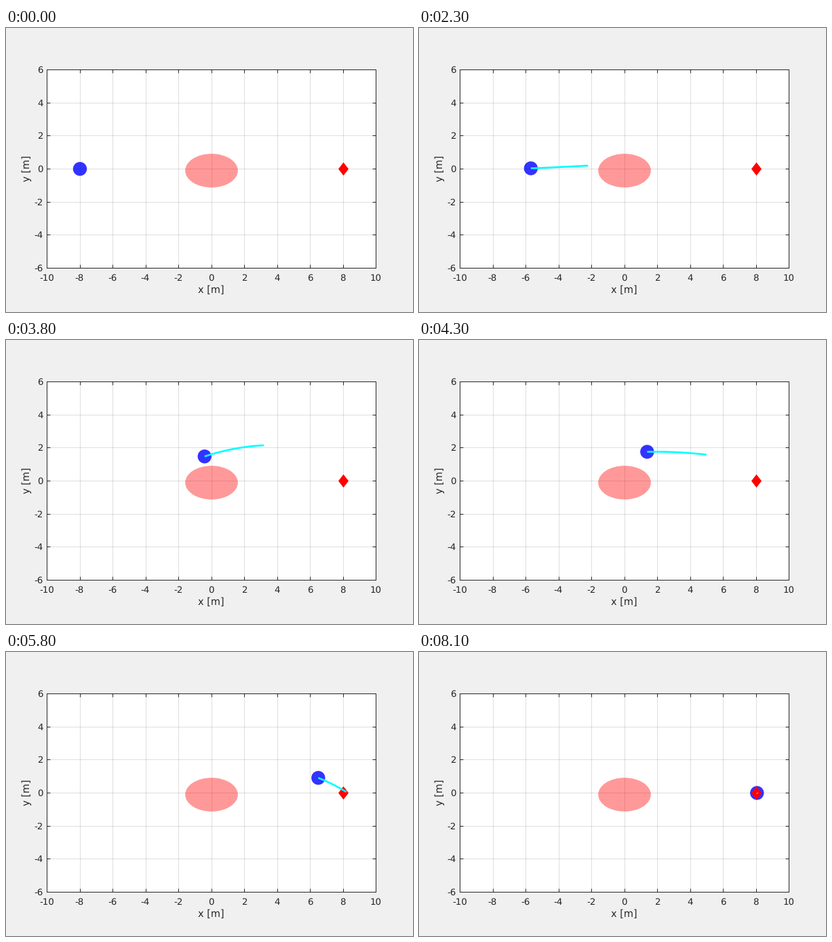
These frames come from a looping animation (600 px wide and 418 px high, 9600 ms). A matplotlib script:

```python
import numpy as np
import matplotlib.pyplot as plt
from matplotlib.animation import FuncAnimation
from matplotlib.patches import Circle, Ellipse, Polygon
from matplotlib.transforms import Affine2D, IdentityTransform

W, H, DPI = 600, 418, 100
LEFT, RIGHT, TOP, BOTTOM = 60, 545, 61, 353
FRAMES, INTERVAL = 96, 100
FIRST, HOLD, LAST = 9, 62, 72
INK = (0.15, 0.15, 0.15)

# Robot motion in metres and steps
START, SPEED, SOFTNESS, HORIZON = -8, 0.36, 3, 10
GO, STOP, NOTICE = 8.8, 53.55, 17

plt.rcParams["font.family"] = "DejaVu Sans"
plt.rcParams["text.hinting"] = "none"


def pt(px):
    return px * 72 / DPI


def sigmoid(v):
    return 1 / (1 + np.exp(-v))


def ramp(t):
    """Distance covered when the speed fades in around t = 0."""
    return SPEED * SOFTNESS * np.logaddexp(0, t / SOFTNESS)


def free_run(step):
    return START + ramp(step - GO) - ramp(-GO)


END = START + SPEED * (STOP - GO) - ramp(-GO)


def path(x):
    """Height of the route: a rise before the obstacle, then a fall to the goal."""
    left = END - x
    return sigmoid((x + 1.5) / 1.05) * left / (1.15 + 0.36 * left)


def robot_at(step):
    x = free_run(step) - ramp(step - STOP)
    return x, path(x)


def plan_at(step):
    """Predicted route: leaves along the tangent and bends towards the path."""
    x, y = robot_at(step)
    lead = min(free_run(step + HORIZON) - x, 0.03 + 1.07 * (END - x))
    tangent = (path(x + 0.01) - path(x - 0.01)) / 0.02 * lead
    bend = 0.5 * sigmoid(step - NOTICE) * (path(x + lead) - y - tangent)
    u = np.linspace(0, 1, 21)
    return x + lead * u, y + tangent * u + bend * u * u


fig = plt.figure(figsize=(W / DPI, H / DPI), dpi=DPI, facecolor="#f0f0f0")
ax = fig.add_axes([LEFT / W, 1 - BOTTOM / H, (RIGHT - LEFT) / W, (BOTTOM - TOP) / H])
ax.set(xlim=(-10, 10), ylim=(-6, 6),
       xticks=range(-10, 11, 2), yticks=range(-6, 7, 2))
ax.set_axisbelow(True)
ax.grid(color=INK, alpha=0.15, linewidth=pt(1))
ax.tick_params(direction="in", top=True, right=True, length=pt(5), width=pt(1),
               color=INK, labelbottom=False, labelleft=False)
for spine in ax.spines.values():
    spine.set(color=INK, linewidth=pt(1))


def label(x, y, text, size=13.33, ha="center", rotation=0):
    fig.text(x, H - y, text, transform=IdentityTransform(), fontsize=pt(size),
             color=INK, ha=ha, va="baseline", rotation=rotation,
             rotation_mode="anchor")


for v in range(-10, 11, 2):
    label(302.5 + (RIGHT - LEFT) / 20 * v, 372, str(v))
for v in range(-6, 7, 2):
    label(54.5, 212 - (BOTTOM - TOP) / 12 * v, str(v), ha="right")
label(302.3, 390, "x [m]", 14.5)
label(34.5, 207, "y [m]", 14.5, rotation=90)

# Grid lines snap to pixel centres; the shapes follow them by half a pixel.
space = ax.transData + Affine2D().translate(0.5, -0.5)


def add(patch, zorder, **style):
    patch.set(linewidth=0, zorder=zorder, transform=space, **style)
    return ax.add_patch(patch)


add(Ellipse((0, -0.1), 3.2, 2.04), 2, facecolor="red", alpha=0.4)
robot = add(Circle((START, 0), 0.42), 3, facecolor="blue", alpha=0.8)
goal = np.array([(-0.31, 0), (0, 0.4), (0.31, 0), (0, -0.4)]) + (8.02, 0)
add(Polygon(goal), 4, facecolor="red")
plan, = ax.plot([], [], color="cyan", linewidth=pt(2.67), transform=space,
                solid_capstyle="butt", zorder=5)


def update(frame):
    step = frame - FIRST + 1 - (frame >= HOLD)
    step = min(max(step, 0), LAST)
    robot.center = robot_at(step)
    plan.set_data(*plan_at(step))
    plan.set_visible(step > 0)
    return robot, plan


anim = FuncAnimation(fig, update, frames=FRAMES, interval=INTERVAL,
                     repeat=True, repeat_delay=0)
plt.show()
```
